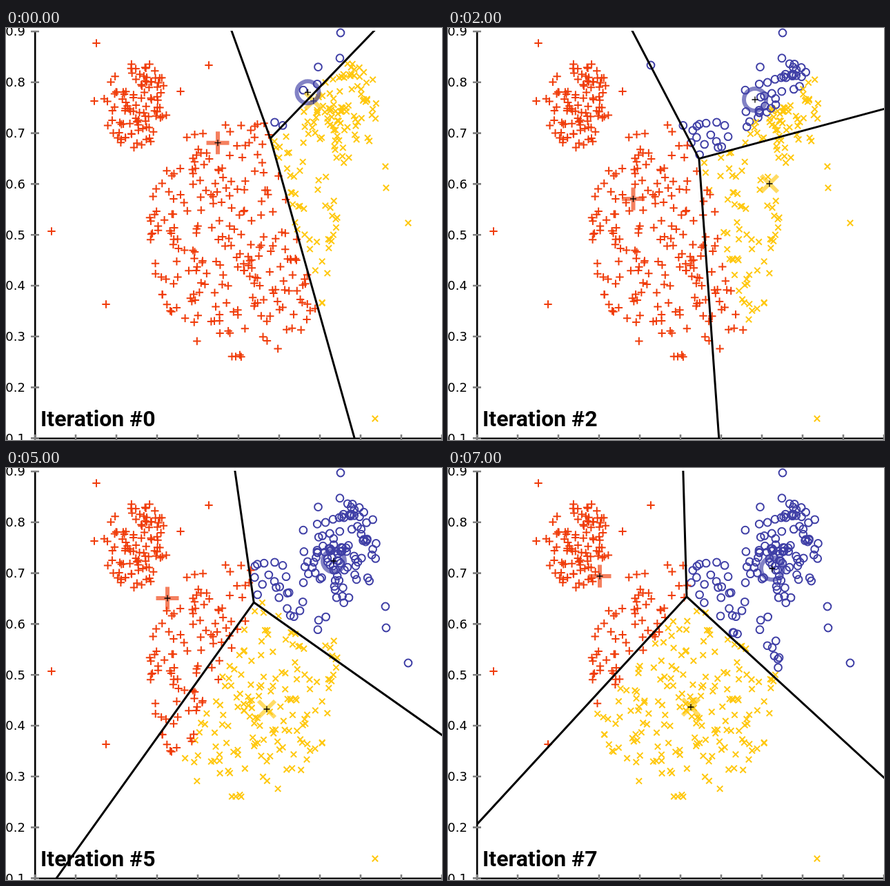
Write an HTML page with a canvas that moves like this. It is 632 px wide and 598 px high and loops after 8000 ms.

```html
<!DOCTYPE html>
<html lang="en">
<head>
<meta charset="utf-8">
<title>k-means iterations</title>
<style>
  html, body { margin: 0; width: 632px; height: 598px; overflow: hidden; background: #fff; }
  canvas { display: block; }
</style>
</head>
<body>
<canvas id="stage" width="632" height="598"></canvas>
<script>
const ctx = document.getElementById('stage').getContext('2d');
const STEP_X = 59, STEP_Y = 73.8, ASPECT = STEP_Y / STEP_X;

// Centroids per iteration: red, yellow, blue
const centroids = [
  [[307, 166.7], [445.8, 105.8], [437.5, 93.3]],
  [[274, 257], [470, 169.5], [432, 93.5]],
  [[268.5, 248], [466, 226], [445, 104]],
  [[258, 238], [440, 289], [469, 115]],
  [[246, 217], [407, 334], [476, 128]],
  [[234, 189], [378, 350], [475, 135]],
  [[226, 172], [363, 348], [473, 141]],
  [[220, 157], [352, 347], [470, 146]],
];

// A few outliers, then three seeded clusters
const points = [
  [66, 295], [145, 401], [131, 22], [294, 54], [485, 7], [583, 283],
  [535, 567], [551, 232], [550, 201], [253, 92], [128, 106],
];

let seed = 20;
function random() {
  seed = (seed + 0x6D2B79F5) | 0;
  let t = Math.imul(seed ^ (seed >>> 15), 1 | seed);
  t = (t + Math.imul(t ^ (t >>> 7), 61 | t)) ^ t;
  return ((t ^ (t >>> 14)) >>> 0) / 4294967296;
}

function addCluster(count, x, y, rx, ry, falloff) {
  for (let i = 0; i < count; i++) {
    const angle = random() * 2 * Math.PI, r = random() ** falloff;
    points.push([x + rx * r * Math.cos(angle), y + ry * r * Math.sin(angle)]);
  }
}
addCluster(100, 188, 110, 48, 64, 0.62);
addCluster(102, 483, 119, 60, 78, 0.7);
addCluster(287, 342, 302, 140, 178, 0.52);

function stroke(color, width, trace) {
  ctx.strokeStyle = color;
  ctx.lineWidth = width;
  ctx.beginPath();
  trace();
  ctx.stroke();
}
function line(x1, y1, x2, y2) {
  ctx.moveTo(x1, y1);
  ctx.lineTo(x2, y2);
}
function plus(x, y, r) {
  line(x - r, y, x + r, y);
  line(x, y - r, x, y + r);
}
function cross(x, y, r) {
  line(x - r, y - r, x + r, y + r);
  line(x - r, y + r, x + r, y - r);
}
function ring(x, y, r) {
  ctx.moveTo(x + r, y);
  ctx.arc(x, y, r, 0, 2 * Math.PI);
}
const markers = [
  { color: '#f03c0a', shape: plus, small: 5.7, large: 16.5 },
  { color: '#ffc80f', shape: cross, small: 4.2, large: 12 },
  { color: '#3f3fa6', shape: ring, small: 5.4, large: 16 },
];

function nearest([x, y], centers) {
  const d = centers.map(([cx, cy]) => Math.hypot((x - cx) * ASPECT, y - cy));
  return d.indexOf(Math.min(...d));
}

// Cell borders: three rays from the circumcenter, in equal-unit coordinates
function drawBorders(centers) {
  const p = centers.map(([x, y]) => [x * ASPECT, y]);
  const [[ax, ay], [bx, by], [cx, cy]] = p;
  const b = [bx - ax, by - ay], c = [cx - ax, cy - ay];
  const det = 2 * (b[0] * c[1] - b[1] * c[0]);
  const bb = b[0] ** 2 + b[1] ** 2, cc = c[0] ** 2 + c[1] ** 2;
  const x = (ax + (c[1] * bb - b[1] * cc) / det) / ASPECT;
  const y = ay + (b[0] * cc - c[0] * bb) / det;

  ctx.save();
  ctx.beginPath();
  ctx.rect(41, 4, 591, 592);
  ctx.clip();
  stroke('#000', 3, () => {
    for (let i = 0; i < 3; i++) {
      const from = p[i], to = p[(i + 1) % 3], other = p[(i + 2) % 3];
      const dx = from[1] - to[1], dy = to[0] - from[0];
      const away = dx * (other[0] - from[0]) + dy * (other[1] - from[1]) > 0 ? -1 : 1;
      const length = away * 2000 / Math.hypot(dx, dy);
      line(x, y, x + dx * length / ASPECT, y + dy * length);
    }
  });
  ctx.restore();
}

function drawAxes() {
  stroke('#000', 2.6, () => {
    line(42.2, 4, 42.2, 597);
    line(41, 595.8, 632, 595.8);
  });
  stroke('#808080', 2.6, () => {
    for (let i = 0; i < 9; i++) line(36, 5 + i * STEP_Y, 48, 5 + i * STEP_Y);
    for (let i = 0; i < 11; i++) line(42 + i * STEP_X, 590, 42 + i * STEP_X, 598);
  });
  ctx.fillStyle = '#000';
  ctx.font = '18px "DejaVu Sans", sans-serif';
  ctx.textAlign = 'right';
  for (let i = 0; i < 9; i++) ctx.fillText(((9 - i) / 10).toFixed(1), 28, 11.3 + i * STEP_Y);
}

function draw(iteration) {
  const centers = centroids[iteration];
  // Points keep the class they got from the centroids one step earlier
  const assigning = centroids[Math.max(0, iteration - 1)];
  ctx.clearRect(0, 0, 632, 598);
  drawAxes();
  for (const point of points) {
    const { color, shape, small } = markers[nearest(point, assigning)];
    stroke(color, 2, () => shape(...point, small));
  }
  centers.forEach((center, i) => {
    const { color, shape, large } = markers[i];
    ctx.globalAlpha = 0.65;
    stroke(color, 6, () => shape(...center, large));
    ctx.globalAlpha = 1;
    stroke('#000', 1.3, () => plus(...center, 4.5));
  });
  drawBorders(centers);
  ctx.font = 'bold 32px Roboto, sans-serif';
  ctx.textAlign = 'left';
  ctx.fillText('Iteration #' + iteration, 50, 578);
}

const start = performance.now();
let shown = -1;
function tick() {
  const iteration = Math.floor((performance.now() - start) / 1000) % centroids.length;
  if (iteration !== shown) draw(shown = iteration);
  requestAnimationFrame(tick);
}
tick();
</script>
</body>
</html>
```
